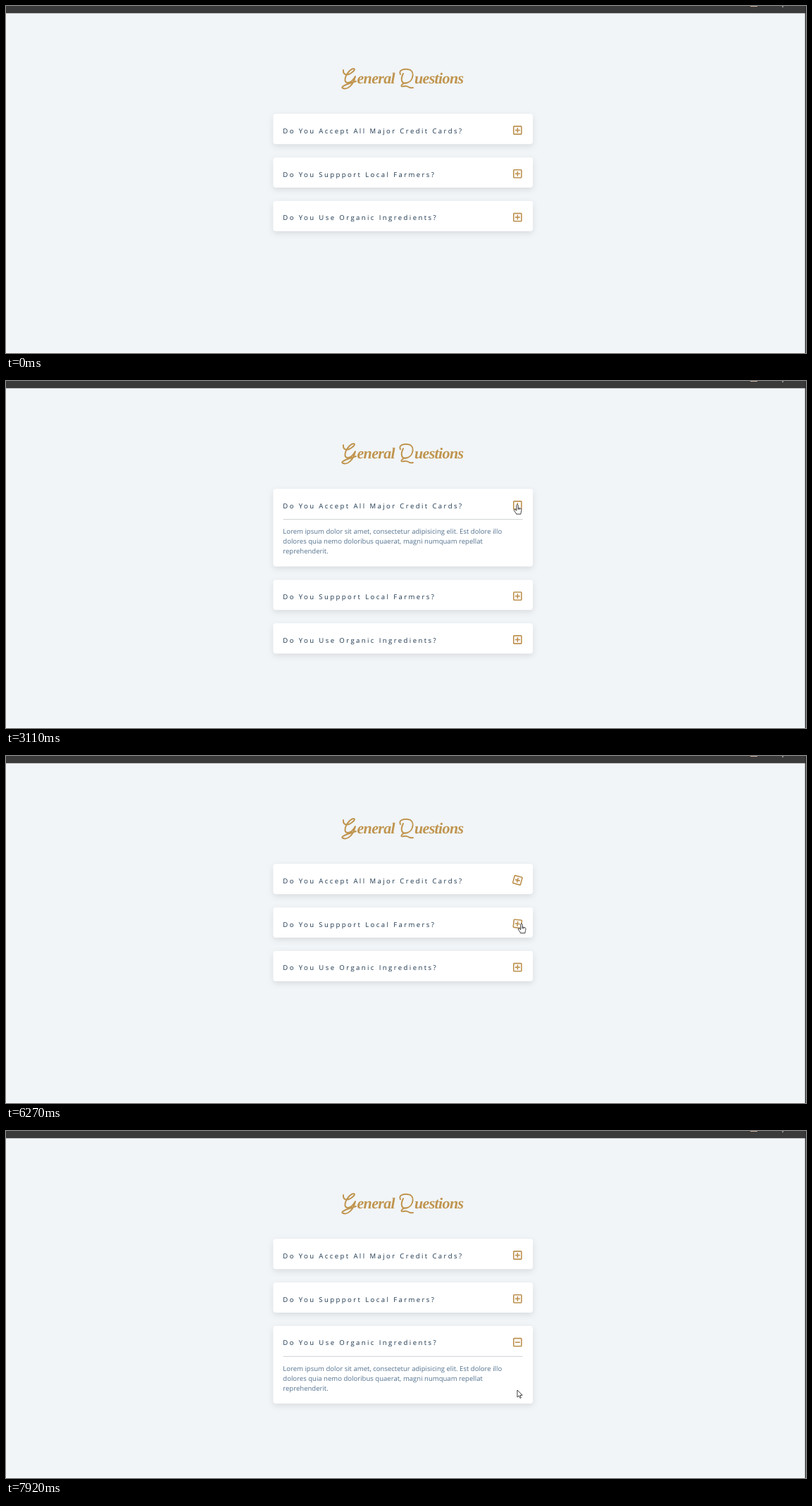
These frames come from a looping animation (1136x493 px, 7.99 s). An HTML page:

```html
<!DOCTYPE html>
<html lang="en">
<head>
<meta charset="utf-8">
<title>General Questions</title>
<style>
  html, body { margin: 0; width: 100%; height: 100%; overflow: hidden; background: #f1f5f8; }
  svg { display: block; width: 100vw; height: 100vh; }
  text { font: 9.56px "Open Sans", sans-serif; text-rendering: geometricPrecision; }
  .title { fill: #c0954f; font: italic bold 22px "Liberation Serif", serif; letter-spacing: -.65px; }
  .swash { fill: none; stroke: #c0954f; stroke-width: 2; stroke-linecap: round; stroke-linejoin: round; }
  .card { fill: #fff; filter: drop-shadow(0 3px 4.5px rgba(0, 0, 0, .1)); }
  .question { fill: #1c364e; letter-spacing: 2.41px; }
  .answer text { fill: #557390; }
  .icon { fill: none; stroke: #bd9150; stroke-width: 1.6; }
  .cursor { fill: #fff; stroke: #2b2b2b; stroke-width: .9; stroke-linejoin: round; }
</style>
</head>
<body>
<svg id="stage" viewBox="0 0 1136 493" preserveAspectRatio="none"></svg>
<script>
const LOOP = 7990, STEP = 10;
const TOP = 153.3, PITCH = 61.85, CLOSED = 42.9, EXTRA = 67.3;
const ICON_X = 726.4, ICON_Y = 23.2, ICON_HALF = 6.7;
const TURN = 90 / 300; // degrees per ms while hovered
const QUESTIONS = [
  'Do You Accept All Major Credit Cards?',
  'Do You Suppport Local Farmers?',
  'Do You Use Organic Ingredients?'
];
const ANSWER = [
  'Lorem ipsum dolor sit amet, consectetur adipisicing elit. Est dolore illo',
  'dolores quia nemo doloribus quaerat, magni numquam repellat',
  'reprehenderit.'
];
const ENTRY = { x: 1068, y: 485 };
const MOVES = [
  { from: 450, to: 730, x: 709, y: 337, bend: 0 },
  { from: 930, to: 1710, x: 726, y: 175.5, bend: -38 },
  { from: 4250, to: 4500, x: 709, y: 178, bend: 0 },
  { from: 4930, to: 5200, x: 732, y: 179, bend: 0 },
  { from: 6000, to: 6280, x: 732, y: 240, bend: 0 },
  { from: 6820, to: 7280, x: 726, y: 368, bend: 11 }
];
const CLICKS = [3040, 5600, 6680, 7610];

const stage = document.getElementById('stage');

function add(parent, tag, attrs = {}, label) {
  const el = document.createElementNS('http://www.w3.org/2000/svg', tag);
  for (const k in attrs) el.setAttribute(k, attrs[k]);
  if (label) el.textContent = label;
  return parent.appendChild(el);
}
const rect = (parent, x, y, width, height, attrs) =>
  add(parent, 'rect', { x, y, width, height, ...attrs });
const show = (el, on) => el.setAttribute('visibility', on ? 'visible' : 'hidden');

function drawPage() {
  rect(stage, 0, 0, 1136, 493, { fill: '#f1f5f8' });
  rect(stage, 0, 492, 1136, 1, { fill: '#fbfcfd' });
  rect(stage, 0, 0, 1136, 10.3, { fill: '#3b3a3b' });
  rect(stage, 1057, 0, 10, 1, { fill: '#c9ae9a' });
  rect(stage, 1102, 0, 2, 2, { fill: '#8d8986' });
  rect(stage, 1134.7, 0, 1.3, 493, { fill: '#2a2a2c' });
}

// Swash capitals lead into italic text
function drawTitle() {
  const word = (rest, x, capital) => {
    add(stage, 'path', { class: 'swash', d: capital });
    add(stage, 'text', { class: 'title', x, y: 110 }, rest);
  };
  word('eneral', 498.5,
    'M479 91C478 99 486 100 494 92C497 88 492 88 488 92C481 99 479 109 485 109' +
    'Q491 109 496 100C493 113 485 119 479 117S484 111 497 107');
  word('uestions', 580,
    'M560 97C557 91 565 89 571 90C581 91 579 106 570 109S560 104 564 96' +
    'M570 109C562 109 558 116 565 114S571 118 578 116');
}

function makeCard(question) {
  const g = add(stage, 'g');
  const box = rect(g, 379.4, 0, 368.8, CLOSED, { rx: 4, class: 'card' });
  add(g, 'text', { x: 393.3, y: 27.4, class: 'question' }, question);
  const answer = add(g, 'g', { class: 'answer' });
  rect(answer, 393.6, 42.8, 340, 1, { fill: '#cfd2d5' });
  ANSWER.forEach((line, i) => add(answer, 'text', { x: 393.3, y: 63.6 + i * 14.3 }, line));
  const icon = add(g, 'g', { class: 'icon' });
  rect(icon, -5.6, -5.6, 11.2, 11.2, { rx: .9 });
  add(icon, 'path', { d: 'M-3.5 0H3.5' });
  const bar = add(icon, 'path', { d: 'M0-3.5V3.5' });
  return { g, box, answer, icon, bar };
}

drawPage();
drawTitle();
const cards = QUESTIONS.map(makeCard);
const cursor = add(stage, 'g', { class: 'cursor' });
const arrow = add(cursor, 'path', { d: 'M0 0V10.2L2.4 8L4 11.6L5.5 10.9L4 7.4H7.2Z' });
const hand = add(cursor, 'path', {
  d: 'M-1.2 8.8V1Q0-1.2 1.2 1V5L4.8 5.6Q6 6 6 7.5C6 10 5 11 5 13.6H-1.4' +
     'C-1.6 11.5-4.6 9.4-4.8 7.6Q-4 6.2-2.6 7.4ZM1.2 5V7.4M3 5.4V7.6'
});

function pointerAt(t) {
  let { x, y } = ENTRY;
  for (const m of MOVES) {
    if (t < m.from) break;
    const k = Math.min(1, (t - m.from) / (m.to - m.from));
    x += (m.x - x) * k + m.bend * Math.sin(Math.PI * k);
    y += (m.y - y) * k;
  }
  return { x, y };
}

const cardTop = (i, open) => TOP + i * PITCH + (open >= 0 && i > open ? EXTRA : 0);

function hoveredIcon({ x, y }, open) {
  return cards.findIndex((_, i) =>
    Math.abs(x - ICON_X) < ICON_HALF &&
    Math.abs(y - cardTop(i, open) - ICON_Y) < ICON_HALF);
}

// Replays hovers and clicks from the loop start up to t
function stateAt(t) {
  const angles = cards.map(() => 0);
  let open = -1, hovered = -1;
  for (let s = 0; s <= t; s += STEP) {
    hovered = hoveredIcon(pointerAt(s), open);
    if (CLICKS.includes(s) && hovered >= 0) {
      open = hovered === open ? -1 : hovered;
      hovered = hoveredIcon(pointerAt(s), open);
    }
    const turn = TURN * Math.min(STEP, t - s);
    angles.forEach((a, i) => {
      angles[i] = Math.max(0, Math.min(90, a + (i === hovered ? turn : -turn)));
    });
  }
  return { open, hovered, angles };
}

function render(t) {
  const { open, hovered, angles } = stateAt(t);
  cards.forEach((card, i) => {
    const isOpen = i === open;
    card.g.setAttribute('transform', `translate(0 ${cardTop(i, open)})`);
    card.box.setAttribute('height', CLOSED + (isOpen ? EXTRA : 0));
    card.icon.setAttribute('transform', `translate(${ICON_X} ${ICON_Y}) rotate(${angles[i]})`);
    show(card.answer, isOpen);
    show(card.bar, !isOpen);
  });
  const { x, y } = pointerAt(t);
  const visible = t >= MOVES[0].from;
  cursor.setAttribute('transform', `translate(${x} ${y})`);
  show(arrow, visible && hovered < 0);
  show(hand, visible && hovered >= 0);
}

const start = performance.now();
function tick() {
  render((performance.now() - start) % LOOP);
  requestAnimationFrame(tick);
}
tick();
</script>
</body>
</html>
```
